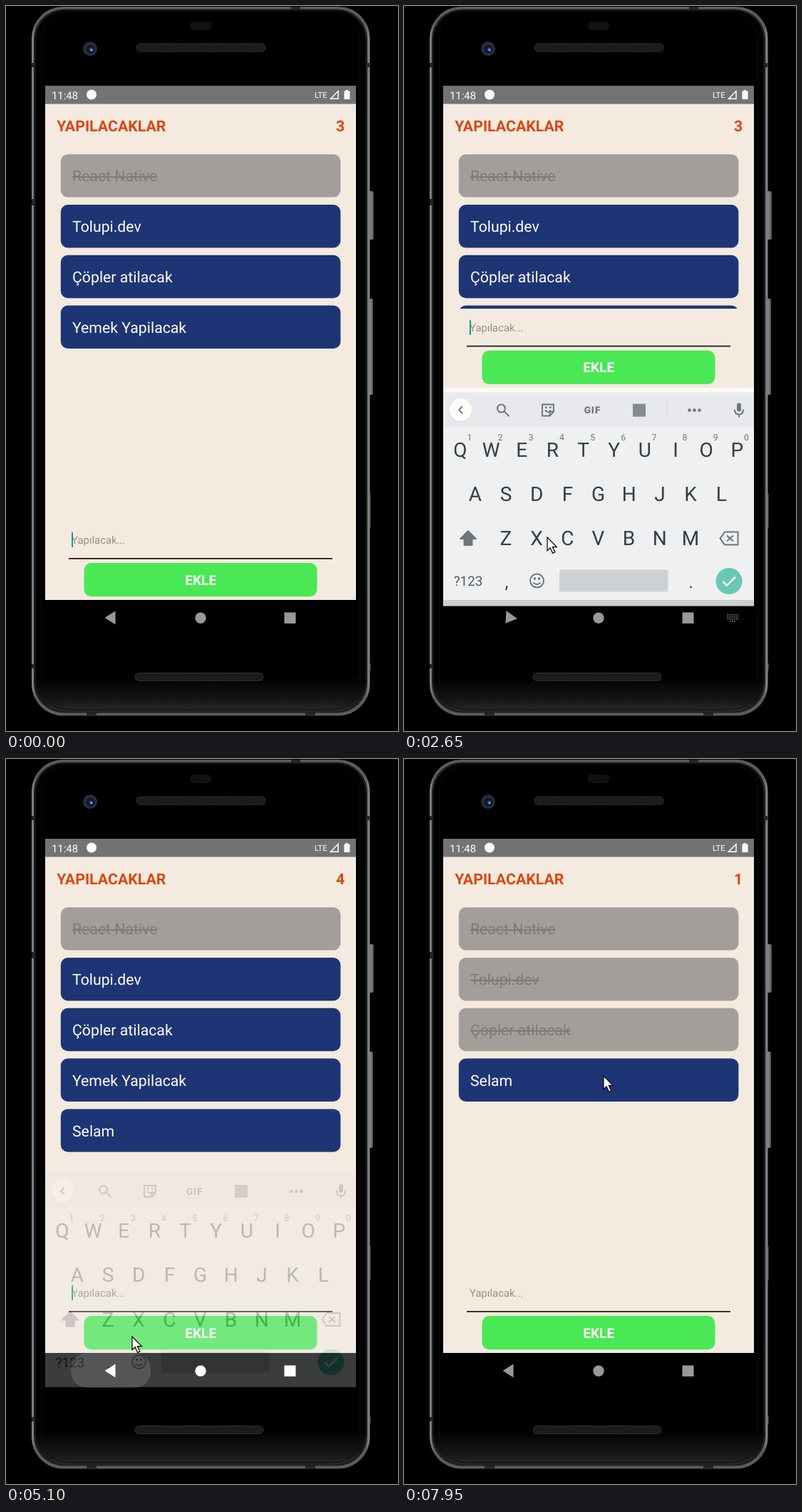
Animation of 550 by 1018 pixels, one loop 8000 ms. Source, as an HTML page:

```html
<!DOCTYPE html>
<html lang="tr">
<head>
<meta charset="utf-8">
<title>Yapılacaklar</title>
<style>
html, body { margin: 0; width: 100%; height: 100%; overflow: hidden; background: #000; }
svg { display: block; width: 550px; height: 1018px; font-family: Roboto, sans-serif; text-rendering: geometricPrecision; }
.mid { text-anchor: middle; }
.icon { fill: none; stroke: #59616a; stroke-width: 2; stroke-linejoin: round; }
.done rect { fill: #a39e9a; }
.done text { fill: #7f7a77; text-decoration: line-through; }
</style>
</head>
<body>
<svg viewBox="0 0 550 1018">
  <defs>
    <linearGradient id="rim">
      <stop offset="0" stop-color="#8a8a8d"/><stop offset=".012" stop-color="#5c5c5e"/>
      <stop offset=".988" stop-color="#5c5c5e"/><stop offset="1" stop-color="#8a8a8d"/>
    </linearGradient>
    <linearGradient id="face" x2="0" y2="1">
      <stop offset="0" stop-color="#000"/><stop offset=".95" stop-color="#000"/>
      <stop offset=".985" stop-color="#17171a"/><stop offset="1" stop-color="#2a2a2d"/>
    </linearGradient>
    <linearGradient id="button">
      <stop offset="0" stop-color="#38383a"/><stop offset=".5" stop-color="#858588"/><stop offset="1" stop-color="#4a4a4c"/>
    </linearGradient>
    <pattern id="mesh" width="4" height="4" patternUnits="userSpaceOnUse">
      <path fill="#262626" d="M0 0h4v4H0z"/><path fill="#111" d="M0 0h2v2H0zM2 2h2v2H2z"/>
    </pattern>
    <clipPath id="listClip"><rect id="listBox" x="55" y="190" width="436" height="530"/></clipPath>
  </defs>

  <g id="phone">
    <g fill="url(#button)">
      <rect x="508" y="260" width="8" height="68" rx="2"/>
      <rect x="508" y="411" width="7" height="135" rx="2"/>
    </g>
    <path fill="#333" d="M509 684h3v48h-3zM509 923h3v10h-3z"/>
    <rect x="36" y="1" width="474.500" height="995.500" rx="44" fill="url(#rim)"/>
    <rect x="39" y="4.500" width="468" height="988" rx="42" fill="#1d1d1e"/>
    <rect x="41.500" y="6.500" width="463" height="984" rx="41" fill="url(#face)"/>
    <rect x="49.500" y="8" width="447" height="980" rx="38" fill="none" stroke="#0d0d0e"/>
    <path fill="#252526" d="M36 80h4v6h-4zM506 80h4v6h-4zM36 271h5v9h-5zM36 924h4v6h-4zM400 1h13v4h-13zM113 992h14v4h-14zM420 992h14v4h-14z"/>
    <rect x="258" y="22" width="30" height="12" rx="5" fill="#111114"/>
    <rect x="183" y="53" width="181" height="11" rx="5.500" fill="url(#mesh)" stroke="#303030"/>
    <rect x="181" y="936.500" width="180" height="11" rx="5.500" fill="url(#mesh)" stroke="#303030"/>
    <circle cx="118" cy="60" r="10" fill="#2b2d36"/>
    <circle cx="118.500" cy="60.500" r="6" fill="#10182f"/>
    <circle cx="119.500" cy="61" r="2.500" fill="#3352a0"/>
    <circle cx="120" cy="62" r="1.200" fill="#a5bce8"/>
  </g>

  <rect x="55" y="112" width="436" height="722" fill="#f4eadf"/>
  <g fill="#fff">
    <rect x="55" y="112" width="436" height="25.500" fill="#757275"/>
    <text x="64" y="130.500" font-size="14.900">11:48</text>
    <circle cx="120" cy="124.500" r="7"/>
    <text x="433" y="129" font-size="11.200">LTE</text>
    <path fill="none" stroke="#fff" stroke-width="1.500" d="M455.500 130.300h10.500v-10.800z"/>
    <path d="M476.500 118h3.500v1.500h2.500v11.500h-8v-11.500h2z"/>
  </g>
  <g fill="#d9480f" font-size="21.300" font-weight="700">
    <text x="71.200" y="175.700">YAPILACAKLAR</text>
    <text id="count" x="475.300" y="175.700" text-anchor="end"></text>
  </g>
  <g clip-path="url(#listClip)"><g id="list"></g></g>

  <rect id="gap" x="55" y="536" width="436" height="298" fill="#fcfaf7"/>
  <g id="form">
    <text id="entry" x="92" y="755" font-size="14.850"></text>
    <path id="compose" stroke="#555" d="M92 757.500h0"/>
    <rect id="caret" y="739" width="2" height="21" fill="#169a83"/>
    <path stroke="#1c1a18" stroke-width="1.800" d="M88 775.800h370"/>
    <g id="add">
      <rect x="109.500" y="782" width="327" height="47.300" rx="10" fill="#4ae854"/>
      <text class="mid" x="273.200" y="812.700" font-size="19.100" font-weight="700" fill="#fff">EKLE</text>
    </g>
  </g>

  <g id="keyboard">
    <rect x="55" y="534" width="436" height="300" fill="#eceff1"/>
    <rect x="55" y="534" width="436" height="48.500" fill="#e4e7eb"/>
    <circle cx="79.500" cy="559.500" r="16.500" fill="#cfd3d7"/>
    <circle cx="79.500" cy="558.700" r="16" fill="#fff"/>
    <path id="chevron" class="icon"/>
    <g id="tools">
      <g class="icon">
        <circle cx="136.500" cy="556.500" r="5.500"/><path d="M140.500 560.500l7 7"/>
        <path d="M194 551h16v10l-5.500 6H194zM204.500 567v-6h5.500M198 559q4 5 8 0"/>
        <path stroke="none" fill="#59616a" d="M198 554h2.500v2.500H198zM204 554h2.500v2.500H204z"/>
      </g>
      <text class="mid" x="264.500" y="563.500" font-size="13.500" font-weight="900" letter-spacing="1" fill="#59616a">GIF</text>
      <rect x="321" y="550" width="18" height="18" fill="#737a82"/>
      <path stroke="#d0d4d8" d="M368.500 547v24"/>
      <g fill="#59616a"><circle cx="400.500" cy="559" r="2.300"/><circle cx="407.500" cy="559" r="2.300"/><circle cx="414.500" cy="559" r="2.300"/></g>
    </g>
    <g id="hints" class="mid" font-size="18.700" fill="#626a73">
      <text x="151" y="566"></text><text x="271.500" y="566"></text><text x="391.500" y="566"></text>
      <path stroke="#c6cacf" d="M208.500 547v24M335.500 547v24"/>
    </g>
    <rect x="467" y="549" width="6" height="12" rx="3" fill="#59616a"/>
    <path class="icon" d="M464 558q0 7 6 7t6-7M470 565v4"/>
    <g id="keys" class="mid" fill="#16232b"></g>
    <path id="shift" class="icon" d="M90 728.500l11 11h-5.500v9h-11v-9H79z"/>
    <path class="icon" d="M450 730h18.500v18H450l-6.500-9zM453 735l9 8M462 735l-9 8"/>
    <text class="mid" x="90" y="805.500" font-size="18.800" fill="#3a454d">?123</text>
    <g class="mid" font-size="25" fill="#16232b"><text x="144" y="808">,</text><text x="402.500" y="808">.</text></g>
    <circle class="icon" cx="186.500" cy="798.500" r="9.500"/>
    <path class="icon" d="M181.500 801q5 5 10 0"/>
    <path fill="#59616a" d="M182 794h3v3h-3zM188 794h3v3h-3z"/>
    <rect x="218" y="783" width="152.500" height="31" rx="3" fill="#c8cbcf"/>
    <circle cx="456" cy="799" r="18.500" fill="#55c0a9"/>
    <path fill="none" stroke="#fff" stroke-width="2.200" d="M447.500 799.500l5.500 5.500 12-12"/>
  </g>

  <rect id="ripple" x="91" y="834" width="112" height="49" rx="23" fill="#fff" opacity=".13"/>
  <g id="nav">
    <path id="back" d="M138.500 859l15-9.500v19z"/>
    <circle cx="273" cy="859.300" r="7.700"/>
    <rect x="390.500" y="851.500" width="16" height="15.500"/>
    <path id="switcher" stroke="#888" stroke-width="1.500" stroke-dasharray="1.700 1.300" d="M453.500 855h16M453.500 858h16M453.500 861h16M457 864h9"/>
  </g>
  <path id="mouse" fill="#fff" stroke="#000" stroke-width="1.200" d="M0 0v18.700l4.200-3.900 3.400 7.600 3.200-1.400-3.400-7.400H13.300z"/>
</svg>

<script>
const LOOP = 8000, STEP = 50;
const $ = id => document.getElementById(id);
const set = (el, attrs) => { for (const k in attrs) el.setAttribute(k, attrs[k]); };
const show = (el, on) => el.setAttribute('visibility', on ? 'visible' : 'hidden');
const ramp = (t, a, b) => Math.min(1, Math.max(0, (t - a) / (b - a)));
const ease = u => u < .5 ? 2 * u * u : 1 - 2 * (1 - u) ** 2;
const between = (t, a, b) => t >= a && t < b;

// Touch feedback: fade to 20 % while held, then back.
const touch = (t, down, up) =>
  1 - .8 * (ease(ramp(t, down, down + 150)) - ease(ramp(t, up, up + 250)));

const ADDED = 4550, DELETED = 7900, OPENED = 2550, CLOSED = 5000;
const tasks = [
  { text: 'React Native', done: 0 },
  { text: 'Tolupi.dev', down: 6000, up: 6150, done: 6200 },
  { text: 'Çöpler atilacak', down: 6800, up: 7000, done: 7000 },
  { text: 'Yemek Yapilacak', down: 7450, up: LOOP, until: DELETED },
  { text: 'Selam', from: ADDED }
];
const typing = [3350, 3500, 3650, 3800, 3950];
const hints = [['S', 'Sen', 'Son'], ['Se', 'Sen', 'Sena'], ['Sel', 'Selam', 'Sele'], ['Sela', 'Selam', 'Selami'], ['Selam', 'Salam', 'Salami']];

const mousePath = [
  [1600, 470, 1030], [1800, 390, 963], [2350, 201, 746], [3700, 201, 746],
  [4250, 307, 500], [4550, 307, 500], [4900, 150, 852], [5000, 150, 852],
  [5100, 177, 811], [5800, 196, 304], [6250, 196, 304], [6700, 226, 371],
  [7050, 226, 371], [7300, 280, 445], [LOOP, 280, 445]
];

$('list').innerHTML = tasks.map(({ text }) =>
  `<g><rect x="76.8" width="392.6" height="60.4" rx="10" fill="#1e3575"/>
   <text x="93" y="38.3" font-size="21.25" fill="#fff">${text}</text></g>`).join('');
const cards = [...$('list').children];

const rows = [['QWERTYUIOP', 79, 614], ['ASDFGHJKL', 100, 676], ['ZXCVBNM', 143, 738.5]];
$('keys').innerHTML = rows.map(([letters, x0, y], r) => [...letters].map((c, i) => {
  const x = x0 + 43.15 * i;
  const digit = r ? '' : `<text x="${x + 13}" y="601.3" font-size="12.3" fill="#59616a">${(i + 1) % 10}</text>`;
  return `<text class="key" x="${x}" data-y="${y}" font-size="28">${c}</text>${digit}`;
}).join('')).join('');
const keys = [...document.querySelectorAll('.key')];
const hintTexts = [...$('hints').querySelectorAll('text')];

function drawTasks(t) {
  let row = 0, open = 0;
  tasks.forEach(({ from = 0, until = LOOP, done = LOOP, down, up }, i) => {
    const alive = between(t, from, until);
    show(cards[i], alive);
    if (!alive) return;
    set(cards[i], {
      transform: `translate(0 ${208.2 + 70.8 * row++})`,
      opacity: down ? touch(t, down, up) : 1,
      class: t >= done ? 'done' : ''
    });
    if (t < done) open++;
  });
  $('count').textContent = open;
}

function caretOn(t) {
  if (t < 2400) return (t + 150) % 1000 < 500;
  if (t < typing[0]) return (t - 2400) % 1000 < 500;
  if (t < 4650) return true;
  return t < 6100 && (t - 4650) % 1000 < 500;
}

function drawForm(t, typed) {
  const lifted = between(t, OPENED, CLOSED);
  set($('form'), { transform: `translate(0 ${lifted ? -298.2 : 0})` });
  set($('listBox'), { height: lifted ? 235 : 530 });
  show($('gap'), lifted);
  $('entry').textContent = typed ? 'Selam'.slice(0, typed) : 'Yapılacak...';
  set($('entry'), { fill: typed ? '#222' : '#999087' });
  const width = typed ? $('entry').getComputedTextLength() : 0;
  set($('compose'), { d: `M92 757.5h${width}` });
  set($('caret'), { x: 92 + width });
  show($('caret'), caretOn(t));
  set($('add'), { opacity: touch(t, 4400, 4550) });
}

function drawKeyboard(t, typed) {
  const shown = t < 4900 ? 1 - (1 - ramp(t, 2460, 2760)) ** 2 : 1 - ramp(t, 4980, 5140);
  set($('keyboard'), { opacity: shown, transform: `translate(0 ${64 * (1 - shown)})` });
  show($('tools'), !typed);
  show($('hints'), typed);
  if (typed) hintTexts.forEach((el, i) => { el.textContent = hints[typed - 1][i]; });
  set($('chevron'), { d: typed ? 'M77 553.500l5 5-5 5' : 'M82 553.500l-5 5 5 5' });
  set($('shift'), { style: typed ? '' : 'fill:#59616a' });
  for (const key of keys) {
    const c = key.textContent;
    key.textContent = typed ? c.toLowerCase() : c.toUpperCase();
    set(key, { y: +key.dataset.y + (typed ? 7.5 : 10.3) });
  }
}

function drawNav(t) {
  const turn = ramp(t, 2530, 2730) - ramp(t, 4950, 5050);
  set($('back'), { transform: `rotate(${-90 * turn} 148 859)` });
  const bright = between(t, 4950, 5350);
  set($('nav'), { fill: bright ? '#fff' : '#999' });
  show($('ripple'), between(t, 4950, 5250));
  show($('switcher'), between(t, OPENED, CLOSED));
}

function drawMouse(t) {
  show($('mouse'), t >= mousePath[0][0]);
  const i = Math.max(1, mousePath.findIndex(p => p[0] > t));
  const [t0, x0, y0] = mousePath[i - 1], [t1, x1, y1] = mousePath[i];
  const u = ease(ramp(t, t0, t1));
  set($('mouse'), { transform: `translate(${x0 + (x1 - x0) * u} ${y0 + (y1 - y0) * u})` });
}

function draw(t) {
  const typed = t < ADDED ? typing.filter(at => t >= at).length : 0;
  drawTasks(t);
  drawForm(t, typed);
  drawKeyboard(t, typed);
  drawNav(t);
  drawMouse(t);
}

const start = performance.now();
function frame() {
  const t = (performance.now() - start) % LOOP;
  draw(Math.floor(t / STEP) * STEP);
  requestAnimationFrame(frame);
}
frame();
</script>
</body>
</html>
```
